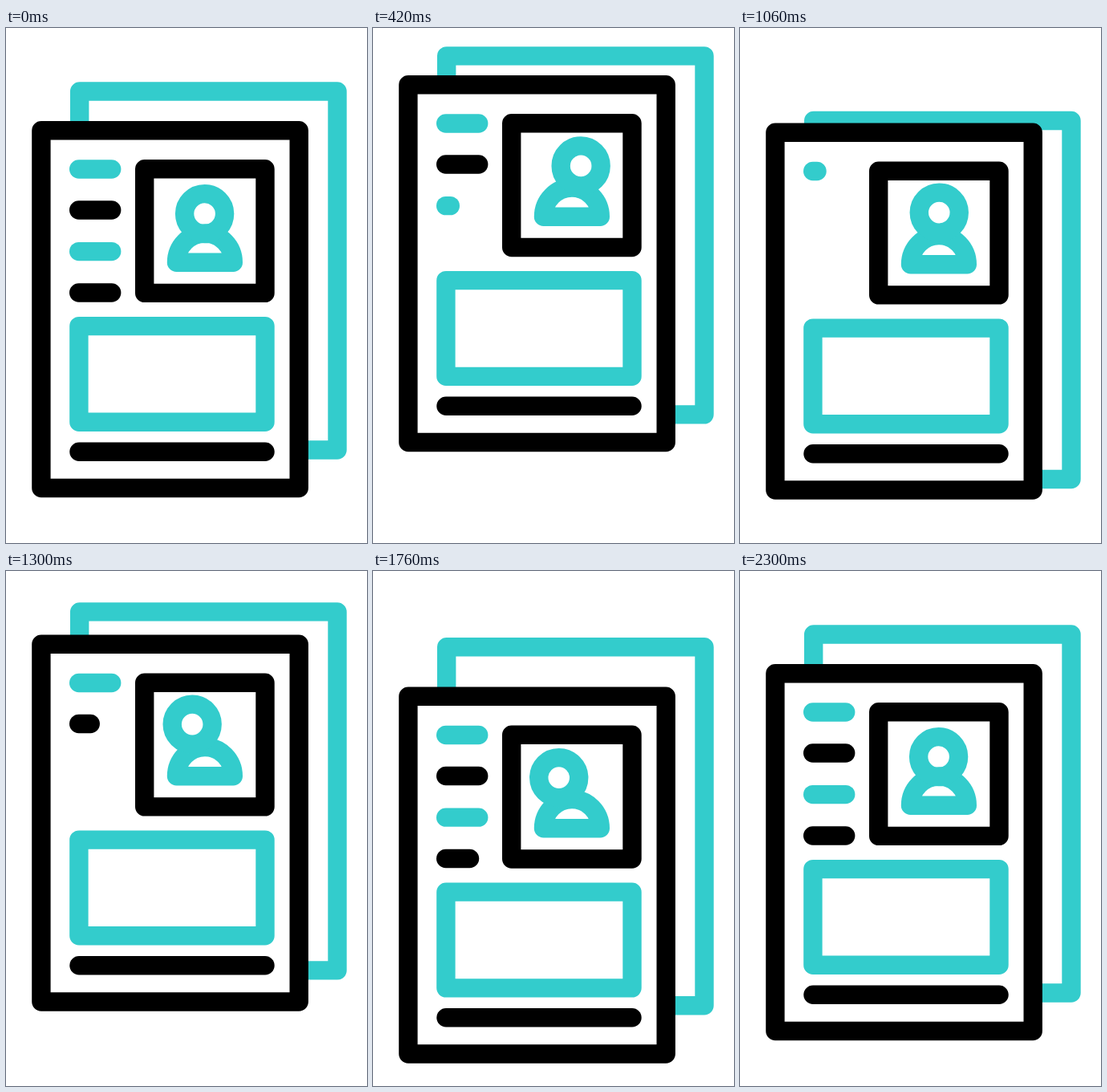
Write an HTML page that moves like this. It is 450 px wide and 642 px high and loops after 2400 ms.

```html
<!DOCTYPE html>
<html lang="en">
<head>
<meta charset="utf-8">
<title>Profile pages</title>
<style>
  html, body { margin: 0; width: 100%; height: 100%; overflow: hidden; background: #fff; }
  svg { display: block; width: 100%; height: 100%; }
  svg * { stroke-width: 23.4; stroke-linecap: round; stroke-linejoin: round; }
  .teal { stroke: #3cc; }
  .black { stroke: #000; }
</style>
</head>
<body>
<svg viewBox="0 0 450 642" fill="none">
  <path id="back" class="teal" d="M91.7 79H413V526H91.7Z"/>
  <g id="front">
    <path class="black" fill="#fff" d="M43.9 127.7H365.2V573.5H43.9Z"/>
    <line class="teal bar" x1="90.7" x2="131.7" y1="176" y2="176"/>
    <line class="black bar" x1="90.7" x2="131.7" y1="227" y2="227"/>
    <line class="teal bar" x1="90.7" x2="131.7" y1="278.6" y2="278.6"/>
    <line class="black bar" x1="90.7" x2="131.7" y1="330" y2="330"/>
    <path class="black" d="M172.7 175.7H323V330.4H172.7Z"/>
    <path class="teal" d="M90.9 371.6H323V491.3H90.9Z"/>
    <path class="black" d="M91 528.2H323"/>
    <path class="teal" d="M212.5 292.2A35.4 36.2 0 0 1 283.3 292.2Z"/>
    <circle id="head" class="teal" cx="247.6" cy="231.6" r="25"/>
  </g>
</svg>
<script>
const LOOP = 2400, STEP = 20, LAG = 125;
const BAR_X = 90.7, BAR_LENGTH = 41;

// Tracks are [time, value] pairs, eased in and out between neighbours.
const bob = [[0, 0], [426, -57], [843, 47], [1262, -37.5], [1785, 29], [2165, 0]];
const headX = [[0, 0], [675, 17], [1580, -25], [2020, 0]];
const headY = [[0, 0], [675, -4], [1580, -4], [2020, 0]];

// Bars retract from the bottom up, then grow back from the top down.
const bars = [...document.querySelectorAll('.bar')].map((el, i) => {
  const out = 146 + (3 - i) * 155, back = 1014 + i * 204;
  return { el, track: [[out, 1], [out + 155, 0], [back, 0], [back + 204, 1]] };
});

const front = document.getElementById('front');
const back = document.getElementById('back');
const head = document.getElementById('head');

function valueAt(track, t) {
  const next = track.findIndex(([time]) => time > t);
  if (next === 0) return track[0][1];
  if (next < 0) return track[track.length - 1][1];
  const [t0, a] = track[next - 1], [t1, b] = track[next];
  const u = (t - t0) / (t1 - t0);
  return a + (b - a) * u * u * (3 - 2 * u);
}

function move(el, x, y) {
  el.setAttribute('transform', `translate(${x.toFixed(2)} ${y.toFixed(2)})`);
}

function draw(t) {
  move(front, 0, valueAt(bob, t));
  move(back, 0, valueAt(bob, t - LAG));
  move(head, valueAt(headX, t), valueAt(headY, t));
  for (const { el, track } of bars) {
    const size = valueAt(track, t);
    el.setAttribute('x2', BAR_X + BAR_LENGTH * size);
    el.setAttribute('visibility', size > 0.002 ? 'visible' : 'hidden');
  }
}

let start;
function tick(now) {
  start ??= now;
  draw(Math.floor(((now - start) % LOOP) / STEP) * STEP);
  requestAnimationFrame(tick);
}
draw(0);
requestAnimationFrame(tick);
</script>
</body>
</html>
```
